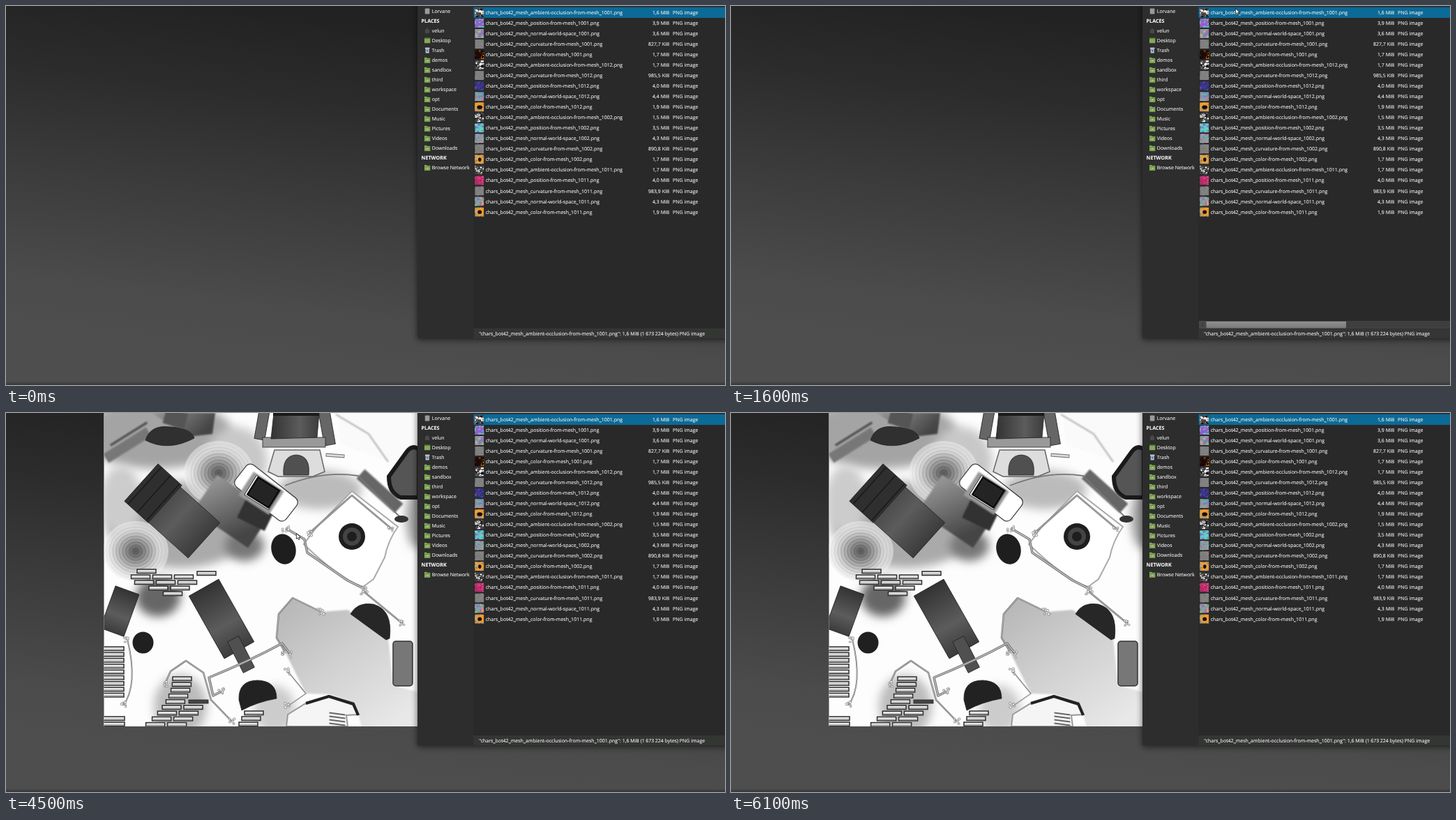
Write an HTML page that moves like this. It is 1031 px wide and 543 px high and loops after 6800 ms.

```html
<!DOCTYPE html>
<html lang="en">
<head>
<meta charset="utf-8">
<title>File browser preview</title>
<style>
html, body { margin: 0; width: 100%; height: 100%; overflow: hidden; background: #3a3a3a; }
svg { display: block; width: 100vw; height: 100vh; }
text { font: 7.02px "Open Sans", "Noto Sans", sans-serif; fill: #f4f4f4; stroke: #f4f4f4; stroke-width: .1px; text-rendering: geometricPrecision; white-space: pre; }
.head { font-weight: 700; font-size: 7.2px; }
.size { text-anchor: end; }
</style>
</head>
<body>
<svg id="stage" viewBox="0 0 1031 543" preserveAspectRatio="none">
  <defs>
    <linearGradient id="desk" gradientUnits="userSpaceOnUse" x1="330" y1="0" x2="270" y2="490">
      <stop offset="0" stop-color="#222"/><stop offset=".25" stop-color="#2c2c2c"/>
      <stop offset=".55" stop-color="#3c3c3c"/><stop offset=".85" stop-color="#4b4b4b"/><stop offset="1" stop-color="#4e4e4e"/>
    </linearGradient>
    <linearGradient id="edge" x2="0" y2="1"><stop stop-color="#222" stop-opacity="0"/><stop offset="1" stop-color="#222" stop-opacity=".55"/></linearGradient>
    <linearGradient id="handle" x2="0" y2="1"><stop stop-color="#9a9a9a"/><stop offset="1" stop-color="#808080"/></linearGradient>
    <linearGradient id="metal"><stop stop-color="#333"/><stop offset=".6" stop-color="#5c5c5c"/><stop offset="1" stop-color="#3c3c3c"/></linearGradient>
    <linearGradient id="fade" x2="1" y2=".4"><stop stop-color="#999"/><stop offset="1" stop-color="#444"/></linearGradient>
    <linearGradient id="floor" x2=".8" y2="1"><stop stop-color="#b4b4b4"/><stop offset=".5" stop-color="#d0d0d0"/><stop offset="1" stop-color="#e8e8e8"/></linearGradient>
    <radialGradient id="swirl"><stop stop-color="#555"/><stop offset=".35" stop-color="#999"/><stop offset=".7" stop-color="#d8d8d8"/><stop offset="1" stop-color="#eee" stop-opacity=".5"/></radialGradient>
    <filter id="soft" x="-40%" y="-40%" width="180%" height="180%"><feGaussianBlur stdDeviation="7"/></filter>
    <filter id="haze" x="-20%" y="-20%" width="140%" height="140%"><feGaussianBlur stdDeviation="1.3"/></filter>
    <filter id="shade" x="-10%" y="-10%" width="120%" height="120%"><feGaussianBlur stdDeviation="5"/></filter>
    <clipPath id="frame"><rect x="140.5" width="450" height="449"/></clipPath>
    <clipPath id="thumb"><rect width="13" height="13"/></clipPath>
  </defs>
  <rect width="1031" height="543" fill="url(#desk)"/>
  <rect y="538" width="1031" height="5" fill="url(#edge)"/>
  <g id="preview" clip-path="url(#frame)"></g>
  <rect x="590" y="-20" width="460" height="498" fill="#000" opacity=".6" filter="url(#shade)"/>
  <g id="win"></g>
  <g id="bar">
    <rect x="671" y="451" width="360" height="11" fill="#414141"/>
    <rect x="671" y="451" width="10" height="11" fill="#4b4b4b"/>
    <path d="M677.5 454l-2.5 2.5 2.5 2.5" fill="none" stroke="#333"/>
    <rect x="681.5" y="452" width="200.5" height="9.5" fill="url(#handle)"/>
  </g>
  <path id="arrow" d="M.4.4V8.4L2.3 6.8 3.6 9.6 5 9 3.8 6.2 6.3 6Z" fill="#fff" stroke="#151515" stroke-width=".8"/>
  <path id="hand" d="M1 4.5Q2 3 3 3.5V1.5Q4 0 5 1.5Q6.2.8 6.6 2.2Q8.4 2 8.3 4V7Q7.5 9.5 5 9.5Q2.5 9.5 1 6.5Z" fill="#fff" stroke="#222" stroke-width=".7"/>
</svg>
<script>
const LOOP = 6800;
const byId = id => document.getElementById(id);

function add(parent, tag, attrs, text) {
  const node = document.createElementNS("http://www.w3.org/2000/svg", tag);
  for (const key in attrs) node.setAttribute(key, attrs[key]);
  if (text) node.textContent = text;
  return parent.appendChild(node);
}

function random(seed) {
  return () => (seed = (seed * 16807) % 2147483647) / 2147483647;
}

// ---------- file browser ----------
const win = byId("win");
const box = (x, y, width, height, fill, extra) => add(win, "rect", { x, y, width, height, fill, ...extra });
const label = (x, y, text, cls = "") => add(win, "text", { x, y, class: cls }, text);

box(590, 0, 441, 476, "#2d2d2d");
box(670.5, 0, 361, 462, "#292929");
box(670.5, 462, 361, 14, "#343634");
box(670.5, 1.7, 361, 15.3, "#0c6a97");

function folder(y) {
  add(win, "path", { d: `M600 ${y - 3.8}h3l1 1h4.3v7h-8.3z`, fill: "#83aa58" });
  box(600.6, y - 1.5, 7.1, .7, "#5e7f3c");
  box(603, y, 2.6, 2, "#a9c985");
}
const icons = {
  Lorvane: y => box(600.8, y - 4, 6.6, 8, "#9a9a9a", { rx: .8 }),
  velun: y => add(win, "path", { d: `M600 ${y}l4-4 4 4h-1v3.6h-6V${y}z`, fill: "#494949" }),
  Desktop: y => { box(600, y - 3.7, 8.3, 7.4, "#83aa58"); box(600, y - 3.7, 8.3, 1.4, "#5f823d"); },
  Trash: y => { box(601, y - 3.8, 6.4, 1.8, "#dfe5ec"); box(601.7, y - 1.6, 5, 5.6, "#b9c8d8"); box(603, y - .6, 2.4, 2.5, "#4c6a93"); }
};
"Lorvane,PLACES,velun,Desktop,Trash,demos,sandbox,third,workspace,opt,Documents,Music,Pictures,Videos,Downloads,NETWORK,Browse Network"
  .split(",").forEach((name, i) => {
    const y = 7.5 + 14 * i;
    if (name === name.toUpperCase()) return label(595.6, y + 2.6, name, "head");
    (icons[name] || folder)(y);
    label(610.8, y + 2.6, name);
  });

const kinds = {
  a: ["ambient-occlusion-from-mesh", "#444 #fff #111 #eee #777"],
  p: ["position-from-mesh"],
  n: ["normal-world-space", "#8a9aa8 #e04f9e #54c77b #5b86d8 #e4a07a"],
  u: ["curvature-from-mesh", "#808080 #858585 #7b7b7b"],
  c: ["color-from-mesh", "#f0a030 #aaa49a #f3941b #8d867c"]
};
const tints = {
  p1001: "#8d62cc #5fb8c8 #b24fd0 #70d0a0", p1012: "#35347c #4a3a9c #28306a #5a479d",
  p1002: "#63c9c4 #7a5fd5 #70dc8c #58a2e0", p1011: "#b52a68 #d32f86 #a1304f #dc4c8c",
  c1001: "#1c0b08 #5b1506 #f0870f #120808"
};

function thumbnail(y, key, seed) {
  const g = add(win, "g", { transform: `translate(672.3 ${y})`, "clip-path": "url(#thumb)" });
  const colors = (tints[key] || kinds[key[0]][1]).split(" ");
  const rnd = random(seed * 7919 + 13);
  add(g, "rect", { width: 13, height: 13, fill: colors[0] });
  for (let i = 0; i < 40; i++)
    add(g, "ellipse", { cx: 13 * rnd(), cy: 13 * rnd(), rx: .4 + 1.6 * rnd(), ry: .4 + 1.6 * rnd(), fill: colors[i % colors.length] });
  if (key[0] === "c") add(g, "ellipse", { cx: 7, cy: 6.8, rx: 2 + 2.4 * rnd(), ry: 2.8, fill: "#170d0b" });
}

`a1001 1,6 M|p1001 3,9 M|n1001 3,6 M|u1001 827,7 K|c1001 1,7 M|a1012 1,7 M|u1012 985,5 K|p1012 4,0 M|n1012 4,4 M|c1012 1,9 M
a1002 1,5 M|p1002 3,5 M|n1002 4,3 M|u1002 890,8 K|c1002 1,7 M|a1011 1,7 M|p1011 4,0 M|u1011 983,9 K|n1011 4,3 M|c1011 1,9 M`
  .split(/[|\n]/).forEach((row, i) => {
    const [key, size, unit] = row.split(" ");
    const y = 9.4 + 15.03 * i;
    thumbnail(y - 6.5, key, i + 1);
    label(687.7, y + 2.6, `chars_bot42_mesh_${kinds[key[0]][0]}_${key.slice(1)}.png`);
    label(951.3, y + 2.6, `${size} ${unit}iB`, "size");
    label(956, y + 2.6, "PNG image");
  });
label(678.3, 471.6, '"chars_bot42_mesh_ambient-occlusion-from-mesh_1001.png": 1,6 MiB (1\u2009673\u2009224 bytes) PNG image');

// ---------- occlusion map ----------
const preview = byId("preview");
const haze = { filter: "url(#haze)" };
const thin = { stroke: "#222", "stroke-width": .8 };
const path = (d, fill, extra) => add(preview, "path", { d, fill, ...extra });
const disc = (cx, cy, rx, ry, fill, extra) => add(preview, "ellipse", { cx, cy, rx, ry, fill, ...extra });
const cloud = (cx, cy, rx, ry, fill) => disc(cx, cy, rx, ry, fill, { filter: "url(#soft)" });
const line = (d, stroke, width, extra) =>
  path(d, "none", { stroke, "stroke-width": width, "stroke-linejoin": "round", ...extra });
const slab = (cx, cy, width, height, angle, fill, extra) => add(preview, "rect", {
  x: -width / 2, y: -height / 2, width, height, fill, transform: `translate(${cx} ${cy}) rotate(${angle})`, ...extra
});

add(preview, "rect", { x: 140, width: 451, height: 450, fill: "#fdfdfd" });
cloud(215, 30, 110, 50, "#a4a4a4");
cloud(330, 70, 45, 50, "#c8c8c8");
cloud(450, 110, 60, 28, "#bbb");
cloud(250, 160, 105, 62, "#aaa");
cloud(165, 125, 30, 50, "#ccc");
cloud(342, 190, 28, 22, "#777");
cloud(218, 264, 32, 28, "#666");
cloud(250, 420, 38, 45, "#bbb");
cloud(385, 425, 30, 35, "#ccc");
cloud(590, 150, 16, 45, "#999");

// rings fade outwards, alternating dark and light
function swirl(cx, cy, radius) {
  disc(cx, cy, radius, radius * .92, "url(#swirl)");
  for (let k = .1; k < 1; k += .1)
    disc(cx, cy, radius * k, radius * k * .92, "none", { stroke: "#555", "stroke-opacity": .5 * (1 - k), "stroke-width": 1.5 });
}
swirl(305, 86, 50);
swirl(186, 198, 47);

// top left
slab(174, 46, 72, 15, -32, "#777", haze);
slab(176, 30, 62, 3, -32, "#444", haze);
path("M209 0H300L296 30 262 34Z", "url(#fade)", haze);
path("M200 39Q207 16 236 20Q266 22 270 36Q232 56 200 39Z", "#303030", thin);
slab(243, 8, 32, 22, 15, "#555", haze);

// top middle
slab(367, 17, 42, 15, 100, "#666", thin);
slab(460, 20, 52, 16, 80, "#666", thin);
slab(413, 42, 90, 14, 0, "#999", thin);
path("M384 0H449L446 35 380 37Z", "url(#metal)", thin);
slab(416, 2, 66, 4, 0, "#1a1a1a");
path("M385 53H450L457 84 440 91H390L376 84Z", "#ddd", { stroke: "#666", "stroke-width": 1.5 });
path("M398 89Q396 61 416 60Q437 61 434 89Z", "#505050", thin);
slab(472, 61, 26, 4, 4, "#ddd", { stroke: "#777" });
disc(506, 47, 6, 5, "#aaa", haze);

// top right
path("M476 0H590V55L552 70 480 45Z", "#fafafa", haze);
line("M473 2 520 30 548 70", "#aaa", 2, haze);
path("M549 91 575 55Q583 45 592 52V121H566Q549 115 549 91Z", "#555", { stroke: "#1a1a1a", "stroke-width": 6 });
slab(536, 112, 74, 18, 42, "#666", haze);
line("M400 104Q455 82 505 90L565 149", "#777", 1.8);
disc(567, 152, 10, 5, "#333");

// body and display
slab(325, 141, 95, 62, 34, "url(#fade)", haze);
slab(239, 142, 121, 68, 42, "url(#metal)", thin);
slab(211, 115, 46, 72, 42, "#2f2f2f", thin);
for (let k = 0; k < 3; k++) slab(199 + 13 * k, 104 + 12 * k, 1.5, 70, 42, "#191919");
slab(358, 145, 44, 32, 26, "#333", haze);
slab(373, 114, 92, 40, 38, "#fff", { rx: 8, stroke: "#444", "stroke-width": 1.3 });
slab(366, 115, 52, 40, 33, "#999", haze);
slab(368, 114, 41, 33, 32, "#eee", thin);
slab(369, 114, 36, 29, 32, "#242424", { stroke: "#000", "stroke-width": 2 });

// plate with hub
path("M496 112 562 163Q548 182 543 207L527 238 512 249Q480 239 427 188L445 164Z", "#fff", { stroke: "#aaa", "stroke-width": 2 });
for (let k = 0; k < 3; k++)
  disc(496, 177, 19 - 6 * k, 19 - 6 * k, k % 2 ? "#444" : "#1e1e1e");
disc(398, 195, 17.5, 22, "#1e1e1e", { transform: "rotate(-14 398 195)" });

// left and centre
slab(163, 284, 64, 36, 110, "url(#metal)", thin);
disc(196.5, 329, 15, 15.5, "#202020");
slab(309, 295, 103, 49, 60.5, "url(#metal)", thin);
slab(337, 346, 50, 18, 63, "#505050", thin);

// floor and half discs
path("M400 342 388 322 391 288 411 265 452 285 490 282 548 322 555 390 591 400V450H510L500 415 463 403 430 402Z", "url(#floor)", haze);
slab(569, 359, 28, 64, 0, "#777", { rx: 4, stroke: "#333", "stroke-width": 1.5 });
path("M494 288Q504 270 527 274Q555 282 550 323L545 325Z", "#272727", thin);
path("M334 411Q333 383 361 383Q388 384 388 409Q360 414 338 426Z", "#222", thin);
path("M402 449 404 432 428 417 463 405 499 415 506 432 488 433 490 449Z", "#f5f5f5", { stroke: "#999", "stroke-width": 2 });
line("M430 416 463 406 498 417 505 433", "#222", 4);
for (let k = 0; k < 4; k++) slab(475, 431 + 5 * k, 23, 2, 7, "#666");

// seams carry a cluster of rivets at both ends
const rnd = random(4242);
function seam(d, width = 2.5) {
  const node = line(d, "#777", width);
  line(d, "#ccc", width / 3);
  for (const end of [0, node.getTotalLength()]) {
    const { x, y } = node.getPointAtLength(end);
    for (let k = 0; k < 6; k++)
      disc(x + 9 * rnd() - 4.5, y + 9 * rnd() - 4.5, 1 + rnd(), 1 + rnd(), "#eee", { stroke: "#777", "stroke-width": .7 });
  }
}
seam("M401 165 428 181 432 200 490 240 514 252", 3.5);
seam("M435 172 496 118 553 166");
seam("M400 342 388 322 391 288 411 265 452 285");
seam("M512 255 569 302");
seam("M309 399 297 405 291 379Q350 355 396 330L408 346", 3.5);
seam("M174 324Q190 390 168 419", 2);
seam("M228 388 236 370 258 355 283 372 294 411 324 442");
seam("M404 370 430 402 404 420", 1.5);

// bricks
function brick(x, y, width = 27) {
  add(preview, "rect", { x, y, width, height: 5.5, fill: "#eaeaea", stroke: "#2b2b2b", "stroke-width": 1.5 });
  add(preview, "rect", { x: x + 1, y: y + 3, width: width - 2, height: 1.8, fill: "#aaa" });
}
function course(x, y, count) {
  for (let k = 0; k < count; k++) brick(x + 31 * k, y);
}
brick(188, 224);
brick(274, 227);
for (let row = 0; row < 4; row++) {
  const count = Math.min(3, 4 - row);
  course(226 + 5 * row - 15.5 * count, 232 + 8 * row, count);
}
for (let row = 0; row < 9; row++) {
  brick(138, 335 + 8.3 * row, 31);
  course(239 - .6 * row * row, 378 + 8.2 * row, row < 5 ? 1 : 2);
}
for (let row = 0; row < 3; row++) brick(342 - 4 * row, 427 + 8 * row);
for (let row = 0; row < 2; row++) brick(138, 435 + 8 * row, 32);
slab(276, 413.5, 28, 5, 0, "#444", thin);

// ---------- timeline: time, x, y ----------
const strokes = [
  [[600, 102, 0], [900, 425, 31], [1200, 667, 8], [1300, 698, 5], [1600, 723, 3], [1900, 708, 7], [2200, 682, 34], [2500, 671.5, 19]],
  [[4500, 416, 172], [5000, 414.5, 173], [5100, 414, 179.5], [5400, 415, 181], [5600, 373, 99], [6000, 152, 1]]
];
const arrow = byId("arrow"), hand = byId("hand"), bar = byId("bar");
const show = (node, on) => node.setAttribute("visibility", on ? "visible" : "hidden");

function place(keys, t) {
  const i = keys.findIndex(key => key[0] > t);
  if (i < 0) return keys.at(-1).slice(1);
  const [t0, x0, y0] = keys[i - 1], [t1, x1, y1] = keys[i];
  const p = (t - t0) / (t1 - t0);
  return [x0 + (x1 - x0) * p, y0 + (y1 - y0) * p];
}

function render(t) {
  const opened = t >= 4500, waiting = t >= 2500 && !opened;
  const beat = t >= 5600 ? 200 : 100;
  const visible = t >= 600 && t < 6100;
  show(arrow, visible && !waiting);
  show(hand, waiting);
  if (visible) {
    const spot = place(strokes[+opened], Math.floor(t / beat) * beat);
    (waiting ? hand : arrow).setAttribute("transform", `translate(${spot})`);
  }
  show(preview, opened);
  show(bar, t >= 1500 && !opened);
  bar.setAttribute("opacity", t < 1600 ? .5 : t < 1700 ? .92 : 1);
}

const start = performance.now();
function tick() {
  render((performance.now() - start) % LOOP);
  requestAnimationFrame(tick);
}
tick();
</script>
</body>
</html>
```
